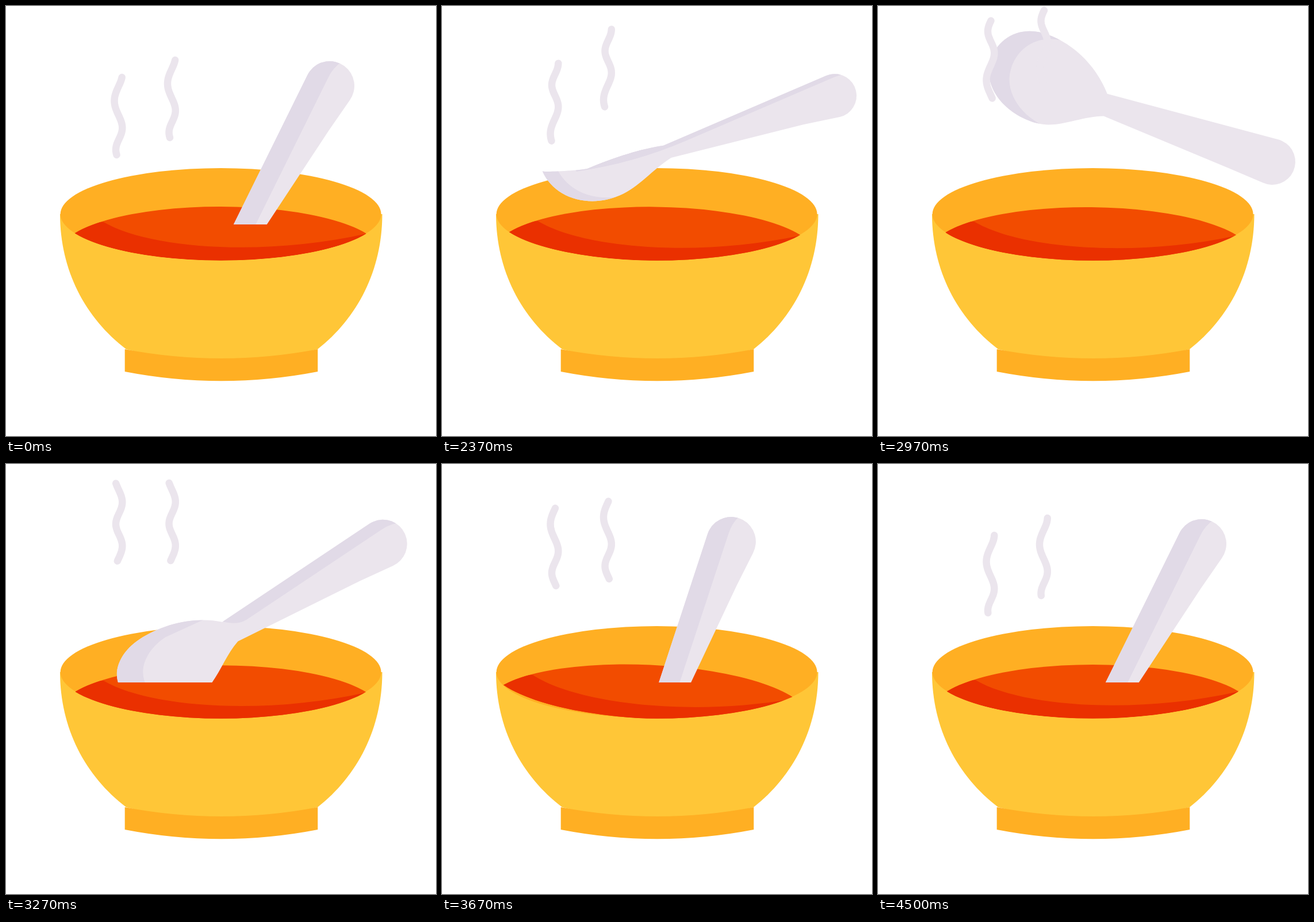
Write an HTML page with a canvas that moves like this. It is 748x748 px and loops after 4.52 s.

```html
<!DOCTYPE html>
<html lang="en">
<head>
<meta charset="utf-8">
<title>Soup bowl</title>
<style>
  html, body { margin: 0; width: 100%; height: 100%; overflow: hidden; background: #fff; }
  canvas { display: block; width: 748px; height: 748px; }
</style>
</head>
<body>
<canvas id="stage" width="748" height="748"></canvas>
<script>
const ctx = document.getElementById('stage').getContext('2d');
const LOOP = 4520, REST = 2020, END = 2480;
const LIGHT = '#ebe5ed', SHADE = '#e1dae7', ORANGE = '#ffaf23', YELLOW = '#ffc637';

const clamp = (v, lo, hi) => Math.min(hi, Math.max(lo, v));
const ease = s => (1 - Math.cos(Math.PI * clamp(s, 0, 1))) / 2;
const pulse = (t, peak, width) => ease(1 - Math.abs(t - peak) / width);

// Spoon forms: handle radius, shade line and its reach, underside at the neck,
// heights of the bowl's upper edge, tip and belly, size of the tip shade.
const side = { r: 38, line: -30, reach: 465, neck: -13, top: -53, tip: -80, low: 12, width: 25, tuck: 4 };
const face = { r: 40, line: -44, reach: 300, neck: -1, top: -113, tip: -40, low: 41, width: 38, tuck: 4 };
const dip = { r: 42, line: -22, reach: 318, neck: 1, top: -97, tip: -42, low: 42, width: 40, tuck: 22 };
const sunk = { ...dip, r: 43, line: -8.6, reach: 340, neck: 4 };

// Key poses: x and y of the handle's round end, angle in degrees.
const keys = [
  { t: 0, x: 563, y: 139, angle: 63.7, ...sunk },
  { t: 350, x: 683, y: 156, angle: 23.3, ...side },
  { t: 950, x: 686, y: 271, angle: -15, ...face },
  { t: 1250, x: 656, y: 139, angle: 33.6, ...dip },
  { t: 1650, x: 503, y: 135, angle: 71.8, ...sunk },
  { t: END, x: 563, y: 139, angle: 63.7, ...sunk }
];

// Smooth spline through the key poses, at rest at both ends.
function poseAt(t) {
  t = clamp(t, 0, END);
  const i = Math.max(0, keys.findIndex(k => t <= k.t) - 1);
  const a = keys[i], b = keys[i + 1], h = b.t - a.t, s = (t - a.t) / h;
  const slope = (j, f) => {
    const p = keys[j - 1], n = keys[j + 1];
    return p && n ? (n[f] - p[f]) / (n.t - p.t) : 0;
  };
  const w = s * s * (3 - 2 * s), pose = {};
  for (const f in a) {
    pose[f] = a[f] + (b[f] - a[f]) * w +
      h * s * (1 - s) * ((1 - s) * slope(i, f) - s * slope(i + 1, f));
  }
  return pose;
}

function fill(color, path) {
  ctx.fillStyle = color;
  ctx.fill(path);
}

function oval(y, ry) {
  const p = new Path2D();
  p.ellipse(373.6, y, 279, ry, 0, 0, 2 * Math.PI);
  return p;
}

const rim = oval(362, 80);
const pool = oval(362, 80.7);
const surface = oval(429, 80);
const soupShade = new Path2D('M170 376C250 423 450 436 626 396L640 460H90V376Z');
const body = new Path2D('M94 362C94 460 138 543 209 597Q374 640 542 597C611 543 654.500 460 654.500 362Z');
const foot = new Path2D('M206.700 597Q374.500 629 542.300 597V636Q374.500 668.500 206.700 636Z');

function drawBowl() {
  fill(YELLOW, body);
  fill(ORANGE, foot);
  fill(ORANGE, rim);
}

function drawSoup(t) {
  const tilt = 0.03 * pulse(t, 175, 200) + 0.016 * pulse(t, 650, 700) +
    0.046 * pulse(t, 1650, 400) - 0.03 * pulse(t, 2120, 360);
  ctx.save();
  ctx.clip(pool);
  ctx.translate(380, 110 + 1.2 * Math.sin(Math.PI * clamp(t / END, 0, 1)));
  ctx.rotate(tilt);
  ctx.translate(-380, -110);
  ctx.clip(pool);
  fill('#f24c00', surface);
  ctx.clip(surface);
  fill('#ea3000', soupShade);
  ctx.restore();
}

const TOP = 445, TIP = 519, LOW = 412, NECK = 308;

// Round end of the spoon's bowl, from upper edge over the tip to the belly.
function addTip(path, p, dx, dy) {
  const k = clamp((p.tip - p.top) / 90, 0.1, 0.58);
  const y = v => v + dy, x = u => u + dx;
  path.lineTo(x(TOP), y(p.top));
  path.bezierCurveTo(x(TOP + k * (TIP - TOP)), y(p.top), x(TIP), y(p.tip + k * (p.top - p.tip)), x(TIP), y(p.tip));
  path.bezierCurveTo(x(TIP), y(p.tip + 0.55 * (p.low - p.tip)), x(LOW + 0.55 * (TIP - LOW)), y(p.low), x(LOW), y(p.low));
}

function spoonOutline(p) {
  const path = new Path2D(), len = LOW - NECK;
  path.arc(0, 0, p.r, 1.4, 1.5 * Math.PI);
  path.lineTo(NECK, -p.r);
  path.bezierCurveTo(NECK + 33, -p.r + 0.62 * (p.top + p.r), TOP - 50, p.top, TOP, p.top);
  addTip(path, p, 0, 0);
  path.bezierCurveTo(LOW - 0.35 * len, p.low, NECK + 0.33 * len, p.neck + 0.25 * (p.low - p.neck), NECK - 4, p.neck);
  path.lineTo(70, 31 + p.neck / 2);
  path.closePath();
  return path;
}

function handleShade(p) {
  const path = new Path2D();
  path.moveTo(-47, p.line + 9);
  path.quadraticCurveTo(-32, p.line, -12, p.line);
  path.lineTo(270, p.line);
  path.quadraticCurveTo((270 + p.reach) / 2, p.line, p.reach, -56);
  path.lineTo(p.reach, -150);
  path.lineTo(-47, -150);
  return path;
}

function tipShade(p) {
  const path = new Path2D(), start = TOP - p.width - 75;
  path.moveTo(start, p.top + p.tuck + 12);
  addTip(path, p, -p.width, p.tuck);
  path.lineTo(LOW - p.width, 90);
  path.lineTo(580, 90);
  path.lineTo(580, -150);
  path.lineTo(start, -150);
  return path;
}

function drawSpoon(t) {
  const p = poseAt(t), a = p.angle * Math.PI / 180;
  const outline = spoonOutline(p);
  ctx.save();
  ctx.beginPath();
  ctx.rect(0, 0, 748, 380); // hidden below the soup's surface
  ctx.clip();
  ctx.transform(-Math.cos(a), Math.sin(a), Math.sin(a), Math.cos(a), p.x, p.y);
  fill(LIGHT, outline);
  ctx.clip(outline);
  fill(SHADE, handleShade(p));
  fill(SHADE, tipShade(p));
  ctx.restore();
}

// Ripple in which every second bend to the left is shallower.
function ripple(d) {
  const q = (d + 44) * Math.PI / 85;
  return -6.5 * Math.cos(2 * q + 0.22 * Math.sin(q)) + 2.5 * Math.cos(q / 2) ** 4;
}

// Rises until the peak time, then sinks back.
function lift(t, peak) {
  return 102 * (t < peak ? ease(t / peak) : 1 - ease(((t - peak) / (END - peak)) ** 0.72));
}

function drawSteam(t, x, top, peak) {
  const y = top - lift(t, peak);
  const slide = 345 * (1 - (1 - clamp(t / END, 0, 1) ** 1.3) ** 3.3);
  ctx.beginPath();
  for (let s = 0; s <= 135; s += 3) ctx.lineTo(x + ripple(s - slide), y + s);
  ctx.strokeStyle = LIGHT;
  ctx.lineWidth = 12.5;
  ctx.lineCap = ctx.lineJoin = 'round';
  ctx.stroke();
}

function draw(t) {
  ctx.fillStyle = '#fff';
  ctx.fillRect(0, 0, 748, 748);
  drawBowl();
  drawSoup(t);
  drawSpoon(t);
  drawSteam(t, 195, 124, 1080);
  drawSteam(t, 287.5, 94, 680);
}

const start = performance.now();
function tick() {
  const now = (performance.now() - start) % LOOP;
  draw(Math.max(0, now - REST));
  requestAnimationFrame(tick);
}
tick();
</script>
</body>
</html>
```
